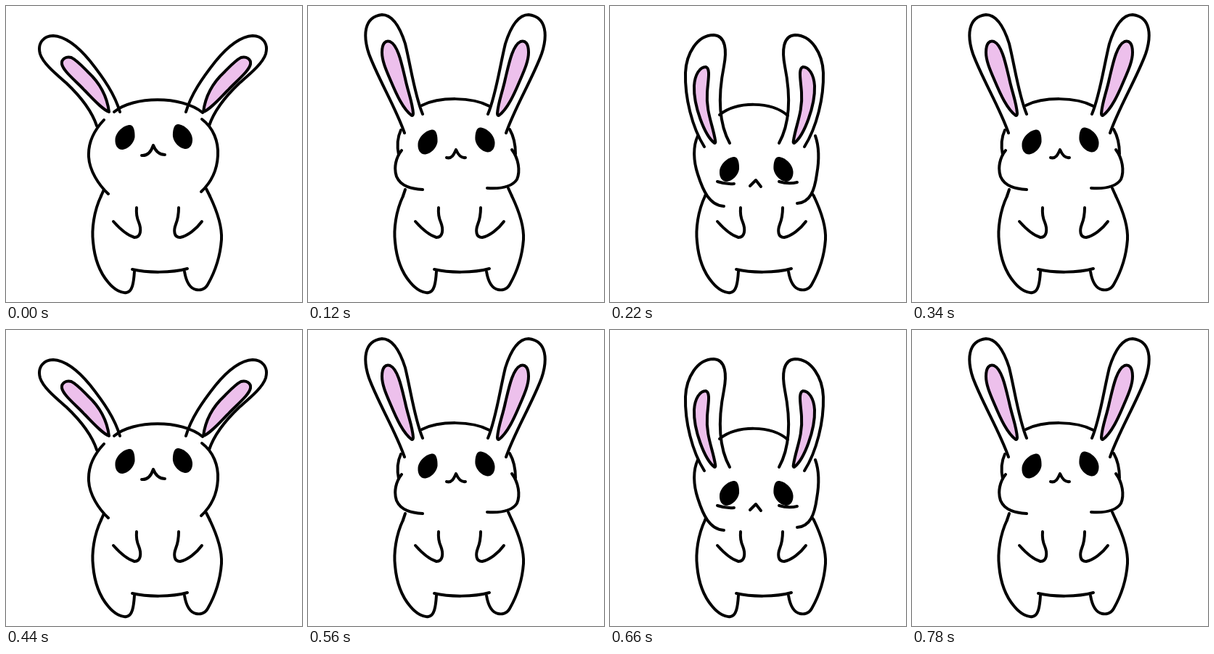
An HTML page for the animation above (880 ms loop, 408x408 px).

```html
<!DOCTYPE html>
<html lang="en">
<head>
<meta charset="utf-8">
<title>Bouncing bunny</title>
<style>
  html, body { margin: 0; width: 100%; height: 100%; overflow: hidden; background: #fff; }
  svg { display: block; width: 100%; height: 100%; }
  .line { fill: none; stroke: #000; stroke-width: 4; stroke-linecap: round; stroke-linejoin: round; }
  .pink { fill: #edc0ec; }
  .eye { fill: #000; stroke: none; }
  .pose { opacity: 0; animation: 440ms step-end infinite; }
  .high { animation-name: high; }
  .middle { animation-name: middle; }
  .low { animation-name: low; }
  /* Holds of 120, 100, 120 and 100 ms */
  @keyframes high { 0% { opacity: 1; } 27.2727%, 100% { opacity: 0; } }
  @keyframes middle { 0% { opacity: 0; } 27.2727% { opacity: 1; } 50% { opacity: 0; } 77.2727%, 100% { opacity: 1; } }
  @keyframes low { 0% { opacity: 0; } 50% { opacity: 1; } 77.2727%, 100% { opacity: 0; } }
</style>
</head>
<body>
<svg viewBox="0 0 408 408">
  <defs>
    <path id="eye" class="eye" d="M7 -17C12 -17 14 -8 13.500 0C12 9 4 16 -3 17C-10 17.500 -14 11 -13.500 3C-13 -7 -2 -17 7 -17Z"/>
    <path id="ear-high" d="M125 165C118 144 102 124 83 106C68 93 51 79 47 66C43 51 52 41 65 41C84 42 102 59 116 76C135 100 150 122 157 146"/>
    <path id="inner-high" d="M142 146C132 142 120 128 108 116C96 103 79 90 77 80C76 73 83 69 90 71C98 75 106 84 113 91C126 103 139 122 142 146Z"/>
    <g id="ear-middle">
      <path d="M133 175C121 140 97 101 84 66C76 42 76 15 102 12C118 12 128 33 134 52C142 85 147 123 158 149"/>
      <path class="pink" d="M143 151C131 142 122 122 114 103C107 87 102 75 102 64C102 51 107 47 113 49C124 54 129 79 134 100C138 119 144 133 145 148Q145 151 143 151Z"/>
    </g>
    <g id="ear-low">
      <path d="M130 194C113 167 103 126 104 92C105 66 120 40 143 40C160 41 161 62 157 83C150 118 148 158 165 189"/>
      <path class="pink" d="M144 189C130 178 115 137 116 110C117 94 124 84 132 84C139 86 135 103 134 119C132 145 142 165 145 185Q146 189 144 189Z"/>
    </g>
  </defs>

  <g class="line">
    <path d="M131 262C121 283 118 308 120 325C122 348 129 367 141 381C150 392 160 396 166 395C174 394 176 382 177 366"/>
    <path d="M281 262C291 283 298 305 297 322C295 350 286 370 278 384C274 391 267 392 262 391C253 389 248 378 246 366"/>
    <path d="M174 363C195 368 228 368 250 362"/>
    <path d="M148 297C156 306 167 316 177 319C186 319 187 308 183 298Q179 289 180 278"/>
    <path d="M270 297C262 308 250 317 240 319C231 319 231 309 234 301Q238 291 238 278"/>
  </g>

  <g class="pose line high">
    <use href="#ear-high"/>
    <use href="#inner-high" class="pink"/>
    <use href="#ear-high" transform="matrix(-1 0 0 1 405 0)"/>
    <use href="#inner-high" class="pink" transform="matrix(-1 0 0 1 414 0)"/>
    <path d="M149 146C175 124 242 123 271 147"/>
    <path d="M135 157C118 175 113 191 114 208C115 227 128 247 141 259"/>
    <path d="M270 156C286 168 293 187 292 206C291 226 283 243 269 256"/>
    <path d="M135 253L131 262M276 252L281 262"/>
    <path d="M187 206Q198 207 203 192Q208 205 219 205"/>
    <use href="#eye" x="164" y="181"/>
    <use href="#eye" transform="matrix(-1 0 0 1 243.500 180)"/>
  </g>

  <g class="pose line middle">
    <use href="#ear-middle"/>
    <use href="#ear-middle" transform="matrix(-1 0 0 1 406 0)"/>
    <path d="M157 137C181 125 226 125 250 138"/>
    <path d="M128 171Q121 186 125 205M278 170Q286 184 286 204"/>
    <path d="M129 199C121 209 118 223 122 235C128 249 143 252 158 253"/>
    <path d="M281 198C290 210 293 227 288 239C280 251 262 252 247 251"/>
    <path d="M134 253L131 262M276 251L281 262"/>
    <path d="M191 209C198 211 201 205 204 198C207 205 211 210 217 209"/>
    <use href="#eye" x="165" y="187.500"/>
    <use href="#eye" transform="matrix(-1 0 0 1 244 184.500)"/>
  </g>

  <g class="pose line low">
    <use href="#ear-low"/>
    <use href="#ear-low" transform="matrix(-1 0 0 1 398 0)"/>
    <path d="M151 150C175 131 222 131 245 151"/>
    <path d="M121 179C114 194 115 214 121 232C128 254 137 275 157 276"/>
    <path d="M283 179C289 196 288 215 285 232C282 254 276 271 258 272"/>
    <path d="M131 262L132 260M281 262L279 259"/>
    <path d="M193 248L201 240L208 249"/>
    <path d="M148 242Q160 246 171 245M233 242Q246 246 258 243"/>
    <use href="#eye" x="164.500" y="225"/>
    <use href="#eye" transform="matrix(-1 0 0 1 239 225)"/>
  </g>
</svg>
</body>
</html>
```
